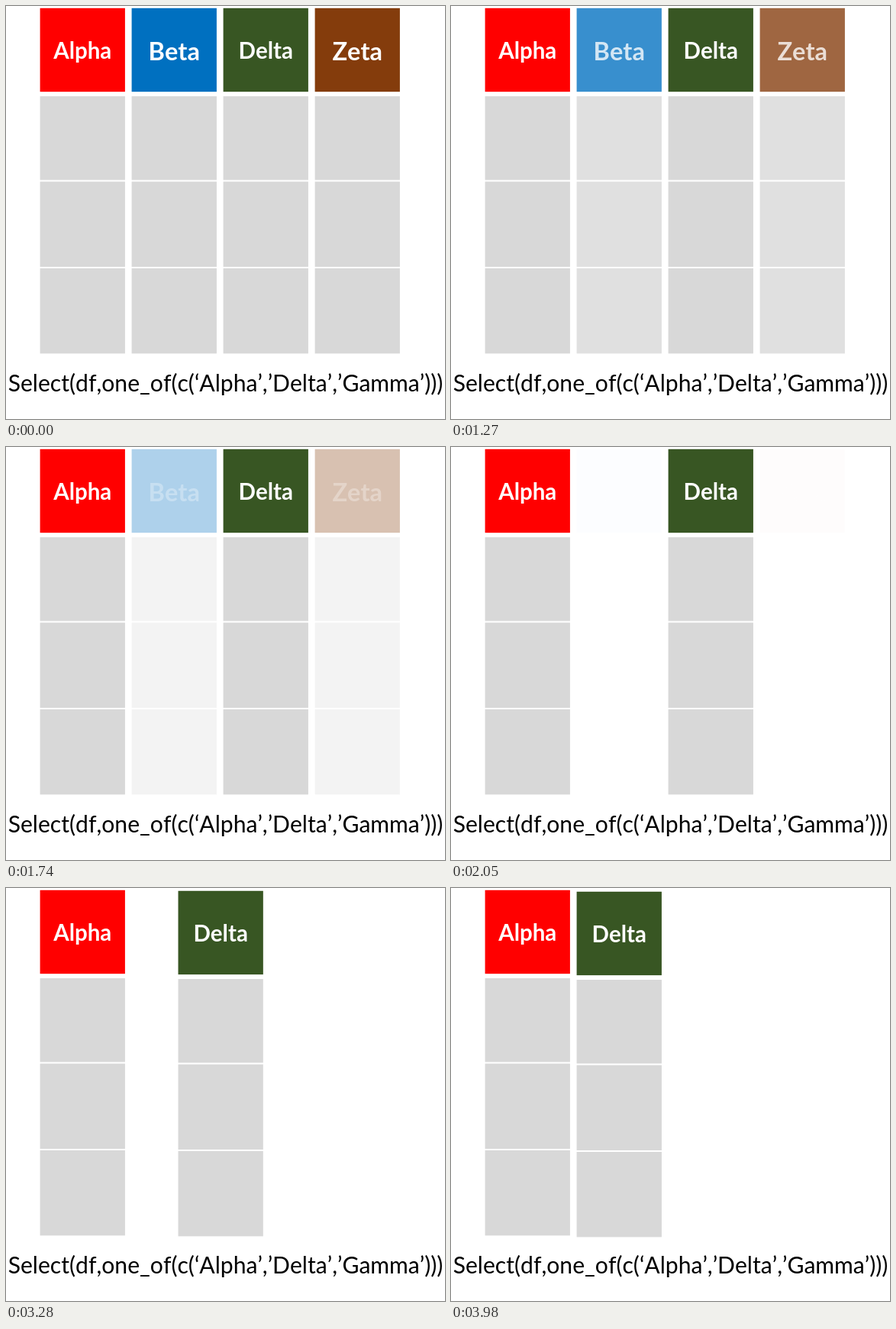
These frames come from a looping animation (575x540 px, 4520 ms). An HTML page:

```html
<!DOCTYPE html>
<html lang="en">
<head>
<meta charset="utf-8">
<style>
  html, body { margin: 0; width: 100%; height: 100%; overflow: hidden; background: #fff; }
  svg { display: block; width: 575px; height: 540px; }
  text { font-family: Lato, sans-serif; text-anchor: middle; font-kerning: none; }
  .title { font-weight: bold; fill: #fff; }
</style>
</head>
<body>
<svg id="stage" viewBox="0 0 575 540">
  <text x="287.5" y="504" font-size="30.1">Select(df,one_of(c(‘Alpha’,’Delta’,’Gamma’)))</text>
</svg>
<script>
const LOOP = 4520, WIDTH = 111.3;
const stage = document.getElementById('stage');

function add(parent, tag, attrs, text = '') {
  const node = document.createElementNS('http://www.w3.org/2000/svg', tag);
  for (const key in attrs) node.setAttribute(key, attrs[key]);
  node.textContent = text;
  return parent.appendChild(node);
}

function makeColumn(index, name, color, size, baseline) {
  const group = add(stage, 'g', {});
  const x = 44.6 + 120 * index;
  const cell = (y, height, fill) => add(group, 'rect', { x, y, width: WIDTH, height, fill });
  cell(2.8, 109.3, color);
  cell(118, 109.5, '#d8d8d8');
  cell(229.6, 111.4, '#d8d8d8');
  cell(343, 111.4, '#d8d8d8');
  add(group, 'text', { class: 'title', x: x + WIDTH / 2, y: baseline, 'font-size': size }, name);
  return group;
}

makeColumn(0, 'Alpha', '#ff0000', 29.5, 69);
const beta = makeColumn(1, 'Beta', '#0070c0', 32.5, 70.7);
const delta = makeColumn(2, 'Delta', '#385623', 29.5, 69);
const zeta = makeColumn(3, 'Zeta', '#843c0c', 32.5, 70.7);

const clamp = v => Math.min(1, Math.max(0, v));
const easeInOut = u => u < 0.5 ? 2 * u * u : 1 - 2 * (1 - u) ** 2;

// Time held on evenly spaced steps between start and end
function stepped(t, start, end, count) {
  const gap = (end - start) / count;
  return start + gap * Math.min(count, Math.floor((t - start + 10) / gap));
}

function draw(t) {
  const fadeTime = stepped(t, 1120, 2050, 12);
  const opacity = t < 1120 ? 1 : t < 2590 ? clamp(1 - (fadeTime - 1055) / 1005) : 0;
  // Cells and titles fade separately, so the titles tint as they go
  for (const column of [beta, zeta])
    for (const part of column.children) part.setAttribute('opacity', opacity);

  const moved = easeInOut(clamp((stepped(t, 2590, 3980, 18) - 2640) / 1300));
  delta.setAttribute('transform', `translate(${-120 * moved} ${2 * moved})`);
}

function tick() {
  draw(performance.now() % LOOP);
  requestAnimationFrame(tick);
}
tick();
</script>
</body>
</html>
```
